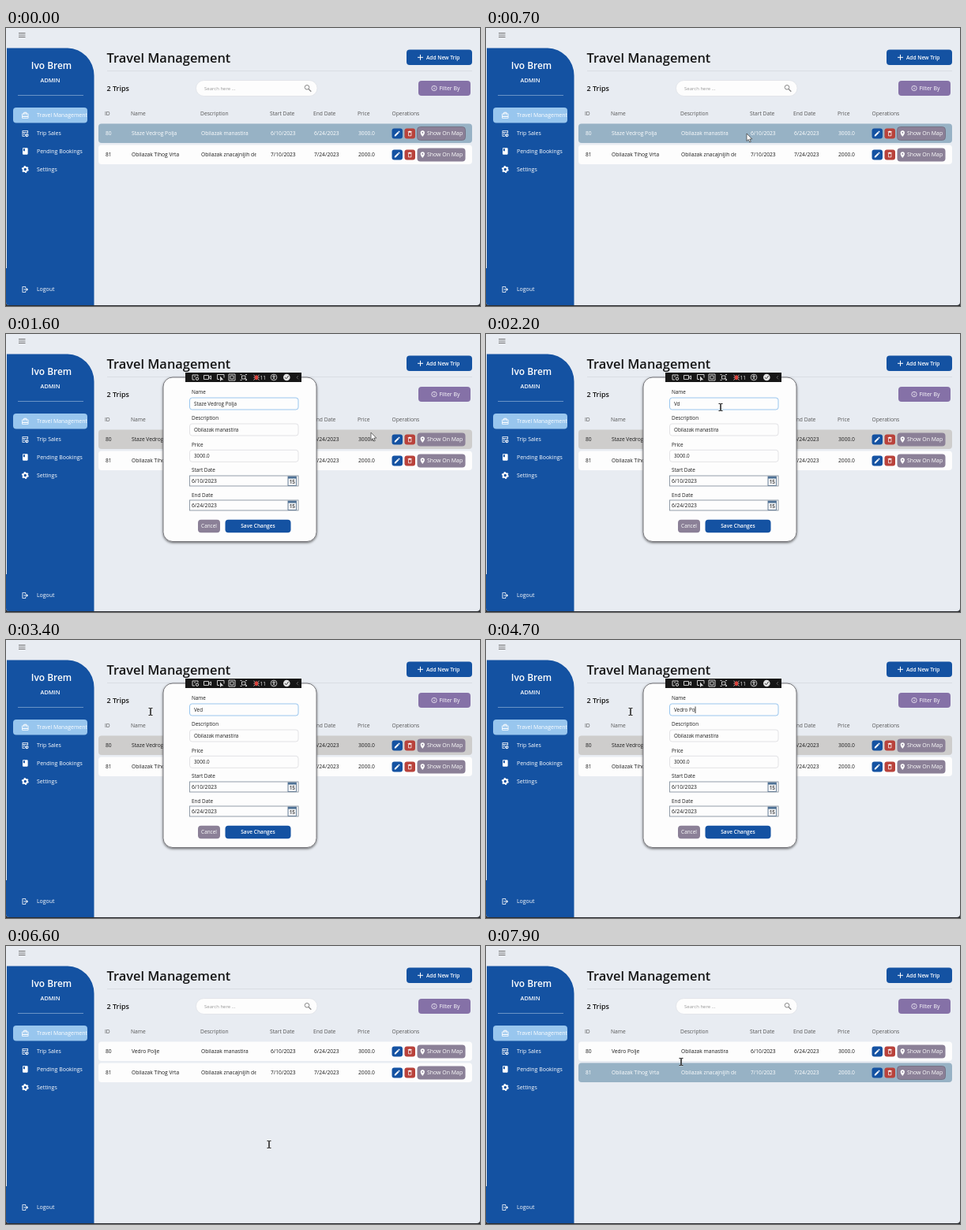
Animation, 600 px wide and 353 px high, one loop 8000 ms. Source, as an HTML page:

```html
<!DOCTYPE html>
<html lang="en">
<head>
<meta charset="utf-8">
<title>Travel Management</title>
<style>
html, body { margin: 0; width: 100%; height: 100%; overflow: hidden; background: #2a2c30; }
svg { display: block; font-family: "Open Sans", "Noto Sans", sans-serif; }
text { white-space: pre; }
</style>
</head>
<body>
<svg id="stage" width="600" height="353" viewBox="0 0 600 353"></svg>
<script>
const BLUE = '#1452a2', LIGHT = '#98c6ee', GREY = '#8b8097', RED = '#b9423b', INK = '#1c1c1c';
const OLD_NAME = 'Staze Vedrog Polja', NEW_NAME = 'Vedro Polje';
const LOOP = 8000, OPEN = 1500, CLOSE = 6200;

// y is the vertical middle of the capitals
const text = (x, y, s, size = 6.75, fill = INK, more = '') =>
  `<text x="${x}" y="${y + size * .357}" font-size="${size}" fill="${fill}" ${more}>${s}</text>`;
const box = (x, y, w, h, r, fill, more = '') =>
  `<rect x="${x}" y="${y}" width="${w}" height="${h}" rx="${r}" fill="${fill}" ${more}/>`;
const line = (d, stroke, width = 1, more = '') =>
  `<path d="${d}" fill="none" stroke="${stroke}" stroke-width="${width}" ${more}/>`;
const ring = (x, y, r, stroke, width = 1, more = '') =>
  `<circle cx="${x}" cy="${y}" r="${r}" fill="none" stroke="${stroke}" stroke-width="${width}" ${more}/>`;
const icon = (name, cx, cy, size, fill = '#fff') =>
  `<path transform="translate(${cx - size / 2} ${cy - size / 2}) scale(${size / 24})" fill="${fill}" fill-rule="evenodd" d="${ICONS[name]}"/>`;
const MID = ' text-anchor="middle"', BOLD = ' font-weight="600"';

const ICONS = {
  edit: 'M3 17.25V21h3.75L17.81 9.94l-3.75-3.75zM20.71 7.04a1 1 0 0 0 0-1.41l-2.34-2.34a1 1 0 0 0-1.41 0l-1.83 1.83 3.75 3.75z',
  trash: 'M6 19a2 2 0 0 0 2 2h8a2 2 0 0 0 2-2V7H6zM8 9h8v10H8zM15.5 4l-1-1h-5l-1 1H5v2h14V4z',
  pin: 'M12 2a7 7 0 0 0-7 7c0 5.25 7 13 7 13s7-7.75 7-13a7 7 0 0 0-7-7zm0 4.5a2.5 2.5 0 1 1 0 5 2.5 2.5 0 0 1 0-5z',
  bag: 'M20 6h-3V4a2 2 0 0 0-2-2H9a2 2 0 0 0-2 2v2H4a2 2 0 0 0-2 2v11a2 2 0 0 0 2 2h16a2 2 0 0 0 2-2V8a2 2 0 0 0-2-2zM9 4h6v2H9zm11 15H4v-2h16zm0-5H4V8h3v2h2V8h6v2h2V8h3z',
  sales: 'M3 3h18v8h-2V9H5v10h6v2H3zM5 5v2h14V5zM7 11h4v2H7zM7 15h3v2H7zM17 12a5 5 0 1 0 .1 0zm-1 2h2v3l2 1-1 1.5-3-1.5z',
  book: 'M18 2H6a2 2 0 0 0-2 2v16a2 2 0 0 0 2 2h12a2 2 0 0 0 2-2V4a2 2 0 0 0-2-2zM6 4h5v8l-2.5-1.5L6 12z',
  exit: 'M3 3h11v5h-2V5H5v14h7v-3h2v5H3zM16 7l5 5-5 5-1.5-1.5 2.5-2.5H8v-2h9l-2.5-2.5z'
};

const gear = (x, y) => ring(x, y, 2.6, '#fff', 1.9) + ring(x, y, 3.9, '#fff', 1.2, 'stroke-dasharray="2.04"');

function sidebar() {
  const item = (y, s, glyph) => (glyph ? icon(glyph, 24.3, y, 10) : gear(24.3, y)) + text(39, y, s, 6.95, '#fff');
  return `<path d="M1 25.5H78A33.5 35 0 0 1 111.5 60.5V352H0V305H1z" fill="${BLUE}"/>` +
    text(57.5, 47.5, 'Ivo Brem', 11.9, '#fff', MID + BOLD) +
    text(56, 66.5, 'ADMIN', 7.3, '#fff', MID + BOLD) +
    line('M15 85.5H98', '#7fa4d0', .8) +
    box(9, 101, 94, 19.5, 4, LIGHT) +
    '<g clip-path="url(#menuClip)">' + item(111, 'Travel Management', 'bag') + '</g>' +
    item(134, 'Trip Sales', 'sales') + item(156.5, 'Pending Bookings', 'book') +
    item(179.5, 'Settings') + item(332, 'Logout', 'exit');
}

function header() {
  const heads = { ID: 125, Name: 158, Description: 246, 'Start Date': 334, 'End Date': 389, Price: 445, Operations: 488.5 };
  return line('M16 6.5h8.5M16 9h8.5M16 11.5h8.5', '#666', .9) +
    text(127.5, 38.5, 'Travel Management', 16.4, '#151515', BOLD) +
    line('M128 54.5H590', '#d6dae1', .8) +
    box(507, 27.5, 83, 19.5, 4, BLUE) +
    line('M521 37.3h7M524.5 33.8v7', '#fff') +
    text(532, 37.5, 'Add New Trip', 6.6, '#fff', BOLD) +
    text(127.5, 77.2, '2 Trips', 9, '#151515', BOLD) +
    box(240.5, 66.5, 153.5, 20, 10, '#fdfdfd', 'stroke="#dde0e6" stroke-width=".7"') +
    text(251, 77, 'Search here ...', 6, '#999') +
    ring(381, 75.3, 2.8, '#888') + line('M383 77.5l3.3 3.3', '#888', 1.3) +
    box(522, 67, 66, 19, 4, '#8571a7') +
    ring(542, 76.5, 3.2, '#fff', .7) + line('M542 76v2M542 74.5v.8', '#fff', .8) +
    text(548.5, 76.7, 'Filter By', 6.9, '#fff') +
    Object.entries(heads).map(([s, x]) => text(x, 109, s, 6.7, '#555')).join('');
}

function row(y, cells, state, editHot) {
  const hover = state == 'hover', ink = hover ? '#fff' : INK, xs = [126, 159, 247, 335, 390, 446];
  const fill = { hover: '#97b2c5', picked: '#cecdcc' }[state] || '#fdfdfd';
  const cell = i => text(xs[i], y, cells[i], 6.7, ink);
  return box(117, y - 12.5, 473, 24.5, 4, fill) +
    [0, 1, 3, 4, 5].map(cell).join('') + '<g clip-path="url(#cellClip)">' + cell(2) + '</g>' +
    box(488.5, y - 6.5, 13.5, 13, 3, editHot ? LIGHT : BLUE, editHot ? `stroke="${BLUE}" stroke-width=".7"` : '') +
    icon('edit', 495.2, y, 9) +
    box(504.5, y - 6.5, 13.5, 13, 3, RED) + icon('trash', 511.2, y, 8.5) +
    box(520.5, y - 8.5, 61, 17, 4, GREY, hover ? 'stroke="#6f6a7d" stroke-width=".8"' : '') +
    icon('pin', 527.3, y, 9) + text(533, y, 'Show On Map', 6.95, '#fff');
}

function toolbar() {
  const white = d => line(d, '#ddd', .9);
  return box(227, 49, 147, 12, 0, '#171717') +
    white('M236 52h7v2M236 52v6h3M238 54h2') + ring(242, 56.7, 1.7, '#ddd') +
    white('M250.5 52.5h6v5h-6zM256.5 55l3-2v4.5z') +
    white('M270 57.5h-2.5v-6h8.5v4') + '<path d="M271 53.5v6.5l1.8-1.7h2.5z" fill="#ddd"/>' +
    white('M282 51h8v8h-8zM284 53h4v4h-4z') +
    white('M296.5 51.5h2M303 51.5h2M296.5 58.5h2M303 58.5h2M298.5 53h4.5v4h-4.5zM302 56l3 2') +
    line('M313.5 52l7 6.5M320.5 52l-7 6.5M313.5 55.2h7', '#e6c9c7', .9) +
    '<ellipse cx="317" cy="55.2" rx="2" ry="3" fill="#d9413a"/>' +
    text(321.5, 55.2, '11', 6.6, '#eee') +
    ring(339, 55, 3.9, '#ddd', .8) + white('M336.7 54h4.6M339 52v3.5l-1.3 2M339 55.5l1.3 2') +
    '<circle cx="355.3" cy="55" r="4.3" fill="#e2e2e2"/>' + line('M353 55l1.7 1.8 3-3.8', '#444') +
    line('M370 53l-2 2.2 2 2.2', '#777', .8);
}

function dialog(name, saveHot) {
  const field = (y, s, edge, more) =>
    box(232.5, y - 7.5, 137.5, 15, 3, '#fdfdfd', `stroke="${edge}" stroke-width=".9"`) + text(238, y + .3, s, 6.3, INK, more);
  const date = (y, s) =>
    box(232.5, y - 6.5, 137.5, 13, 0, '#fdfdfd', 'stroke="#8793a0" stroke-width=".9"') + text(235, y, s) +
    box(357, y - 5.5, 10.5, 11.5, 0, '#f4f5f7', 'stroke="#5c7690" stroke-width=".9"') +
    box(357, y - 5.5, 10.5, 2.6, 0, '#4f7296') +
    text(362.3, y + 1.6, '15', 6.4, '#333', MID + BOLD);
  const labels = { Name: 74, Description: 107, Price: 140.5, 'Start Date': 173, 'End Date': 204.5 };
  return box(199, 55, 194, 208.5, 12, '#fdfdfd', 'stroke="#77777b" filter="url(#shadow)"') +
    Object.entries(labels).map(([s, y]) => text(235, y, s, 6.4)).join('') +
    field(88.5, name, '#8fc0ec', 'id="name"') + field(121.5, 'Obilazak manastira', '#dfdfe2') +
    field(154.8, '3000.0', '#dfdfe2') + date(186.5, '6/10/2023') + date(217.5, '6/24/2023') +
    box(243, 235.7, 28, 16.5, 4, GREY) + text(257, 244, 'Cancel', 6.4, '#fff', MID) +
    box(277.5, 235.7, 83, 16.5, 4, saveHot ? LIGHT : BLUE) +
    text(319, 244, 'Save Changes', 6.6, '#fff', MID + BOLD) + toolbar();
}

const PATH = [[700, 330, 134], [1300, 492, 132], [1500, 492, 132], [1900, 300, 88], [2200, 297, 93], [2700, 297, 93],
  [3300, 183, 91], [5000, 183, 91], [5700, 336, 242], [6200, 336, 242], [6600, 333, 252], [7000, 333, 252],
  [7700, 250, 155], [7900, 247, 147]];

function cursor(t) {
  if (t < PATH[0][0]) return '';
  let i = PATH.findIndex(p => p[0] > t);
  if (i < 0) i = PATH.length - 1;
  const [t0, x0, y0] = PATH[i - 1], [t1, x1, y1] = PATH[i];
  const k = Math.min(1, (t - t0) / (t1 - t0)), e = k * k * (3 - 2 * k);
  const at = `transform="translate(${x0 + (x1 - x0) * e} ${y0 + (y1 - y0) * e})"`;
  if (t < 1700) return `<path ${at} d="M0 0v9.5l2.2-2 1.6 3.5 1.5-.7-1.5-3.3h3z" fill="#fff" stroke="#333" stroke-width=".7"/>`;
  const beam = 'M-2.5-4.5h1.8q.7 0 .7.7v7.6q0 .7-.7.7h-1.8M2.5-4.5h-1.8q-.7 0-.7.7v7.6q0 .7.7.7h1.8';
  return line(beam, '#fff', 2, at + ' opacity=".6"') + line(beam, '#111', .95, at);
}

function typed(t) {
  if (t < 1900) return OLD_NAME;
  if (t >= 2200 && t < 2700) return 'Vd';
  const keys = [2000, 3000, 3300, 3600, 3900, 4200, 4400, 4700, 4900, 5000, 5200];
  return NEW_NAME.slice(0, keys.filter(k => k <= t).length);
}

const stage = document.getElementById('stage');
stage.innerHTML = `<defs>
  <clipPath id="window"><rect y="-9" width="600" height="361" rx="4"/></clipPath>
  <clipPath id="menuClip"><rect x="9" y="101" width="93.5" height="20"/></clipPath>
  <clipPath id="cellClip"><rect x="246" y="120" width="70.5" height="60"/></clipPath>
  <filter id="shadow"><feDropShadow dx="0" dy="1.3" stdDeviation="1.6" flood-opacity=".55"/></filter></defs>` +
  '<g clip-path="url(#window)">' + box(0, 0, 600, 353, 0, '#e8ecf2') + sidebar() + header() + '<g id="live"></g></g>';
const live = document.getElementById('live');
let shown = -1;

function draw(t) {
  const open = t >= OPEN && t < CLOSE;
  const first = t < OPEN ? 'hover' : open ? 'picked' : '';
  live.innerHTML =
    row(134, ['80', t < CLOSE ? OLD_NAME : NEW_NAME, 'Obilazak manastira', '6/10/2023', '6/24/2023', '3000.0'], first, t >= 1200 && t < OPEN) +
    row(161, ['81', 'Obilazak Tihog Vrta', 'Obilazak znacajnijih delova', '7/10/2023', '7/24/2023', '2000.0'], t >= 7600 ? 'hover' : '') +
    (open ? dialog(typed(t), t >= 5700) : '') + '<g id="caret"></g>' + cursor(t);
  if (open && t >= 1900 && t < 5400 && Math.floor(t / 500) % 2) {
    const x = 238.5 + document.getElementById('name').getComputedTextLength();
    document.getElementById('caret').innerHTML = line(`M${x} 84.5v8.5`, '#111', .8);
  }
}

function tick(now) {
  const t = Math.floor(now % LOOP / 100) * 100;
  if (t != shown) draw(shown = t);
  requestAnimationFrame(tick);
}
draw(0);
requestAnimationFrame(tick);
</script>
</body>
</html>
```
